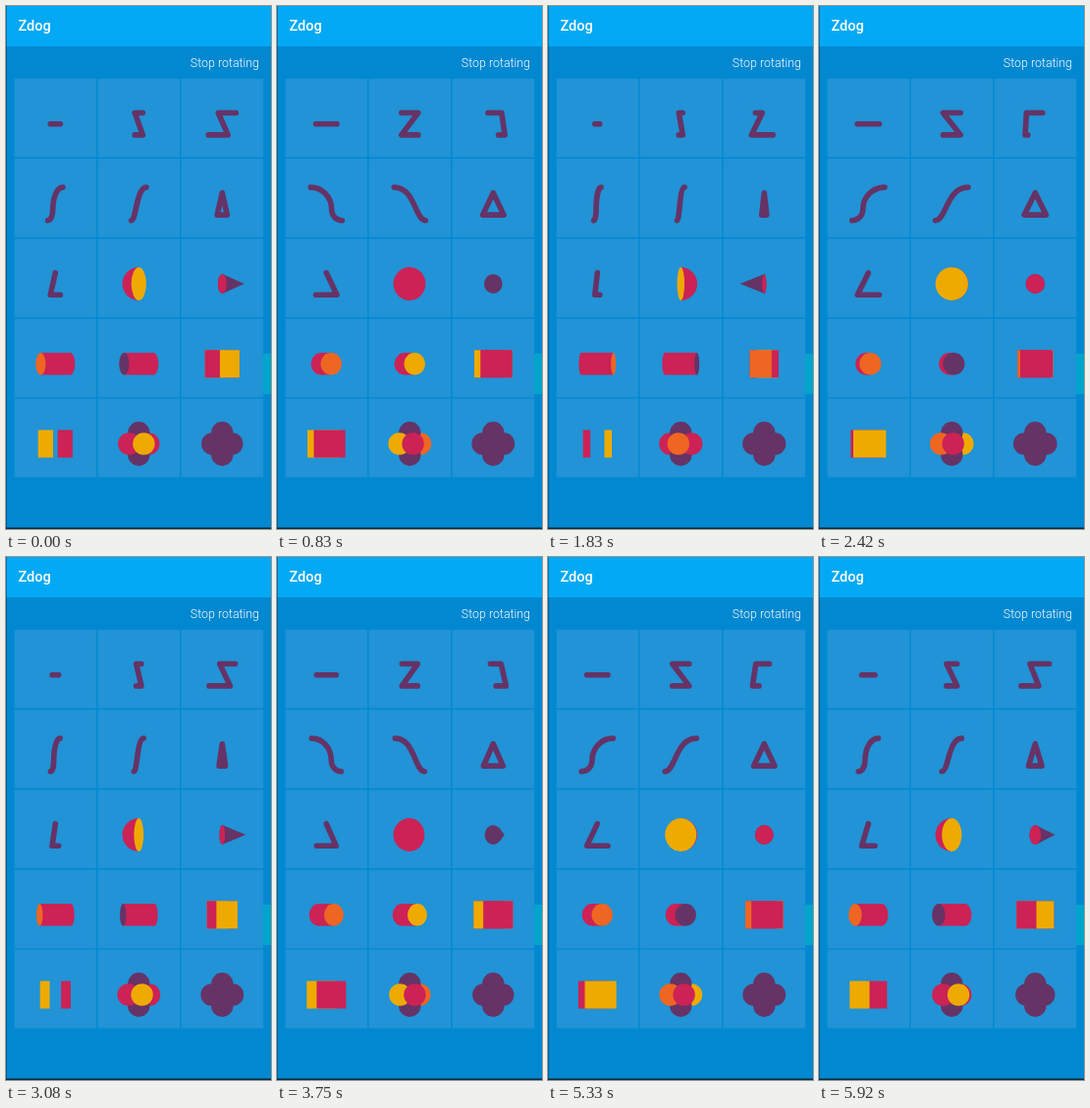
Animation of 270 by 531 pixels, one loop 6010 ms. Source, as an HTML page with a canvas:

```html
<!DOCTYPE html>
<html lang="en">
<head>
<meta charset="utf-8">
<title>Zdog</title>
<style>
  html, body { margin: 0; width: 100%; height: 100%; overflow: hidden; background: #0288d1; }
  header { position: absolute; width: 270px; height: 41px; background: #03a9f4; }
  canvas { position: absolute; left: 0; top: 0; }
  span { position: absolute; color: #fff; font-family: Roboto, sans-serif; line-height: 20px; white-space: nowrap; }
  .title { left: 12.5px; top: 11px; font-size: 14.5px; font-weight: 500; }
  .action { left: 158px; width: 100px; top: 48px; font-size: 12.4px; font-weight: 300; text-align: right; }
</style>
</head>
<body>
<header></header>
<canvas width="270" height="531"></canvas>
<span class="title">Zdog</span>
<span class="action">Stop rotating</span>
<script>
const ctx = document.querySelector('canvas').getContext('2d');
const RED = '#c25', ORANGE = '#e62', YELLOW = '#ea0', PURPLE = '#636';
const LOOP = 6010, STEPS = 72, SCALE = 0.28;
let sin, cos;

const px = (x, z = 0) => x * cos - z * sin;
const pz = (x, z = 0) => z * cos + x * sin;

function fill(color, build) {
  ctx.beginPath();
  build();
  ctx.fillStyle = color;
  ctx.fill();
}

const rect = (color, x, y, w, h) => fill(color, () => ctx.rect(x, y, w, h));

// Disc facing the z axis, seen edge-on as an ellipse
const disc = (color, x, r) =>
  fill(color, () => ctx.ellipse(x, 0, r * Math.abs(cos), r, 0, 0, 7));

// Each segment is a flat list of coordinates: a point [x, y, z] or a curve [[..], [..], [..]]
const stroke = (closed, start, ...segments) => () => {
  const flat = ([x, y, z]) => [px(x, z), y];
  ctx.beginPath();
  ctx.moveTo(...flat(start));
  for (const s of segments) {
    if (Array.isArray(s[0])) ctx.bezierCurveTo(...s.flatMap(flat));
    else ctx.lineTo(...flat(s));
  }
  if (closed) ctx.closePath();
  ctx.lineWidth = 20;
  ctx.lineCap = ctx.lineJoin = 'round';
  ctx.strokeStyle = PURPLE;
  ctx.stroke();
};

function hemisphere() {
  const r = 60, from = sin > 0 ? -Math.PI / 2 : Math.PI / 2;
  fill(RED, () => ctx.arc(0, 0, r, from, from + Math.PI));
  disc(cos > 0 ? RED : YELLOW, 0, r);
}

function cone() {
  const r = 35, tip = px(0, 90), touch = r * cos * cos * r / tip;
  disc(PURPLE, 0, r);
  if (Math.abs(tip) > r * Math.abs(cos)) {
    const h = r * Math.sqrt(1 - (r * cos / tip) ** 2);
    fill(PURPLE, () => {
      ctx.moveTo(tip, 0);
      ctx.lineTo(touch, h);
      ctx.lineTo(touch, -h);
    });
  }
  if (cos < 0) disc(RED, 0, r);
}

const cylinder = (front, rear) => () => {
  const near = px(0, cos > 0 ? 60 : -60);
  disc(RED, -near, 40);
  rect(RED, -near, -40, 2 * near, 80);
  disc(cos > 0 ? front : rear, near, 40);
};

// Faces: [color, corner x, corner z, corner x, corner z]
const box = (...faces) => () => faces
  .map(([color, x1, z1, x2, z2]) => ({
    color, a: px(x1, z1), b: px(x2, z2), depth: pz(x1 + x2, z1 + z2)
  }))
  .sort((f, g) => f.depth - g.depth)
  .forEach(f => rect(f.color, f.a, -50, f.b - f.a, 100));

const dots = (...colors) => () => {
  const [left, right, ends] = colors;
  [[0, -40, 0, PURPLE], [0, 40, 0, PURPLE], [-40, 0, 0, left], [40, 0, 0, right],
    [0, 0, -40, ends], [0, 0, 40, ends]]
    .sort((a, b) => pz(a[0], a[2]) - pz(b[0], b[2]))
    .forEach(([x, y, z, color]) => fill(color, () => ctx.arc(px(x, z), y, 40, 0, 7)));
};

const frontFace = [RED, -60, 40, 60, 40];
const triangle = [[0, -40, 0], [40, 40, 0], [-40, 40, 0]];

const shapes = [
  stroke(false, [-40, 0, 0], [40, 0, 0]),
  stroke(false, [-32, -40, 0], [32, -40, 0], [-32, 40, 0], [32, 40, 0]),
  stroke(false, [-32, -40, 40], [32, -40, 0], [32, 40, 40], [32, 40, -40]),
  stroke(false, [-60, -60, 0],
    [[-15, -60, 0], [20, -25, 0], [20, 20, 0]],
    [[20, 42.5, 0], [37.5, 60, 0], [60, 60, 0]]),
  stroke(false, [-60, -60, 0], [[20, -60, 0], [20, 60, 0], [60, 60, 0]]),
  stroke(true, ...triangle),
  stroke(false, ...triangle),
  hemisphere,
  cone,
  cylinder(ORANGE, ORANGE),
  cylinder(YELLOW, PURPLE),
  box(frontFace, [RED, -60, -40, 60, -40], [YELLOW, -60, -40, -60, 40], [ORANGE, 60, -40, 60, 40]),
  box(frontFace, [YELLOW, -60, -40, 60, -40]),
  dots(YELLOW, ORANGE, RED),
  dots(PURPLE, PURPLE, PURPLE)
];

// The turn advances in 10 degree ticks, 12 per second, on a 10 ms clock
function tickAt(time) {
  const tick = Math.round(time * 0.012);
  const starts = Math.round(tick * 25 / 3) * 10;
  return Math.min(STEPS - 1, starts > time ? tick - 1 : tick);
}

function draw() {
  const angle = (243 + 10 * tickAt(performance.now() % LOOP)) * Math.PI / 180;
  sin = Math.sin(angle);
  cos = Math.cos(angle);
  ctx.clearRect(0, 0, 270, 531);
  rect('#00a5cc', 262, 353, 8, 41);
  shapes.forEach((shape, i) => {
    const col = i % 3, row = Math.floor(i / 3);
    rect('#2193d6', 8.6 + 85 * col, 73.8 + 81.2 * row, 83.6, 79.8);
    ctx.save();
    ctx.translate(50.3 + 85 * col, 119.7 + 81.2 * row);
    ctx.scale(SCALE, SCALE);
    shape();
    ctx.restore();
  });
  rect('#0a2a40', 0, 529.5, 270, 1.5);
  rect('rgba(0,30,60,.45)', 0, 0, 0.8, 531);
  requestAnimationFrame(draw);
}
draw();
</script>
</body>
</html>
```
